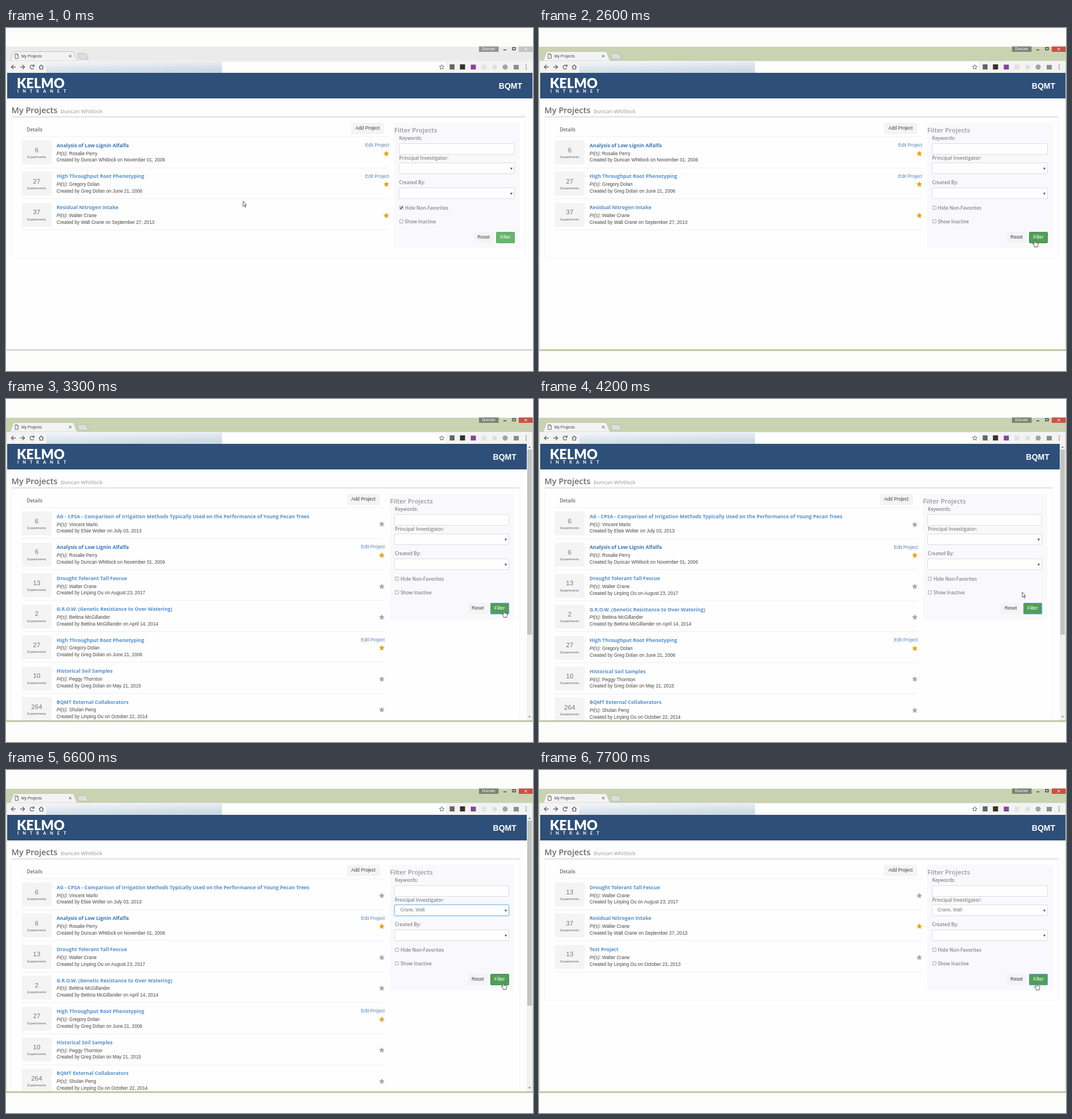
These frames come from a looping animation (927 by 604 pixels, 8 s). An HTML page:

```html
<!DOCTYPE html>
<html lang="en">
<head>
<meta charset="utf-8">
<title>My Projects</title>
<style>
html, body { margin: 0; width: 100%; height: 100%; overflow: hidden; background: #fdfefc; }
#stage { position: absolute; left: 0; top: 0; width: 927px; height: 604px; overflow: hidden;
  font: 8.25px "Liberation Sans", Arial, sans-serif; color: #444;
  --s: 0; --bar: #ebebeb; --close: #c4c4c4; --badge: #929292; --line: #b4b4b4; }
#stage.active { --bar: #c9d3b1; --close: #cb5045; --badge: #7d8270; --line: #a9b292; }
#stage div, #stage svg { position: absolute; box-sizing: border-box; }
.t { position: absolute; line-height: 0; white-space: nowrap; }
.c { transform: translateX(-50%); }
.os { font-family: "Open Sans", sans-serif; font-weight: 600; }
#page { left: 0; top: 0; width: 927px; height: 604px; background: #fdfefd; clip-path: inset(79px 1px 38px 2px); }
#header { left: 0; top: 79px; width: 927px; height: 45px; background: #2d4f78; color: #fff; }
#rule { left: 10px; top: 155px; height: 3px; width: calc(904px - 10.2px * var(--s)); background: #e7e8e8; }
#box { left: 9px; top: 158px; width: calc(905px - 10.2px * var(--s)); border: 1px solid #f3f4f3; border-top: 0; }
#list { left: 28px; top: 191px; width: calc(646px - 7.6px * var(--s)); border-top: 1px solid #f0f0f0; }
#stage .row { position: relative; overflow: hidden; border-bottom: 1px solid #f0f0f0; }
.item { left: 0; top: 0; width: 100%; height: 55px; }
.count { left: 0; top: 6.4px; width: 52px; height: 42px; background: #f4f4f4; }
.count::after { content: ""; position: absolute; left: 52px; top: 5px; border: 3px solid transparent; border-left-color: #f4f4f4; border-right: 0; }
.title { font-size: 8.75px; font-weight: 700; color: #5690cc; }
.title.strong { color: #3576bd; }
.edit { right: 0; color: #5c85b8; }
.star { right: 0; top: 23.5px; width: 10px; height: 10px; }
.btn { height: 20px; border-radius: 2px; background: #f4f4f4; color: #444; text-align: center; line-height: 20.5px; }
#panel { left: calc(683px - 7.6px * var(--s)); top: 167px; width: calc(221px - 2.6px * var(--s)); height: 221px; background: #f9f9fd; color: #858585; }
.field { left: 8px; right: 9px; height: 20px; border: 1px solid #dcdde0; border-radius: 2px; background: #fefefe; }
.field.focus { border-color: #7db9e6; box-shadow: 0 0 3px #a5d2f0; }
.field.sel::after { content: ""; position: absolute; right: 3px; top: 7.5px; border: 2px solid transparent; border-top: 4px solid #555; border-bottom: 0; }
.check { left: 8.5px; width: 7px; height: 7px; border: 1px solid #b0b0b0; border-radius: 1px; background: #f4f4f4; }
.check svg { left: -1px; top: -1px; }
#filter { right: 9px; top: 192px; width: 33px; background: #66b56d; border: 1px solid #5dae64; color: #fff; line-height: 18.5px; }
#filter.dark { background: #509f56; border-color: #438b48; }
#filter.focus { border-color: #5b9fd0; box-shadow: 0 0 1px #5b9fd0; }
#menu { left: 684px; top: 257px; width: 202px; height: 210px; background: #fefefe; border: 1px solid #a9b6c2; color: #777; }
#hover { left: 0; width: 190px; height: 10.5px; background: #2f90f7; }
.track { background: #f1f1f1; }
.thumb { background: #c3c3c3; }
#scroll { left: 916px; top: 79px; width: 10px; height: 488px; }
#cursor { left: 0; top: 0; overflow: visible; }
</style>
</head>
<body>
<div id="stage">
  <div id="page">
    <div id="header"></div>
    <div id="rule"></div>
    <div id="box"></div>
    <div id="list"></div>
    <div class="btn" style="left:calc(607px - 7.5px*var(--s));top:167px;width:58px">Add Project</div>
    <div id="panel"></div>
    <div id="menu"></div>
    <div id="scroll" class="track">
      <div id="thumb" class="thumb" style="left:1px;top:10px;width:8px"></div>
      <svg width="10" height="488" fill="#666"><path d="M3 7l2-2.5 2 2.5zM3 479.5l2 2.5 2-2.5z"/></svg>
    </div>
  </div>
  <svg id="chrome" width="927" height="604" fill="none">
    <path d="M0 33H927V58H0zM0 58H1V569H0zM926 58H927V569H926zM0 567H927V569H0z" fill="var(--bar)"/>
    <path d="M1 566H926V567H1z" fill="var(--line)"/>
    <path d="M6 58C10 57 11 41.5 15 41.5H117C121 41.5 122 57 127 58z" fill="#f3f3f3" stroke="#b5b8b0" stroke-width=".7"/>
    <path d="M126 45H141L145 55H131Q129 55 128 53z" fill="#dcdeda" stroke="#a9aca4" stroke-width=".7"/>
    <path d="M1 58H926V79H1z" fill="#f3f3f3"/>
    <path d="M71 60H774V78H71z" fill="#fefefe"/>
    <linearGradient id="blur" x2=".4" y2="1"><stop stop-color="#f3f6f9"/><stop offset="1" stop-color="#cddae5"/></linearGradient>
    <path d="M71 59H380V79H71z" fill="url(#blur)"/>
    <path d="M832 32.5H866.5V42H832z" fill="var(--badge)"/>
    <path d="M902 32.5H926.5V42H902z" fill="var(--close)"/>
    <path d="M912 35l4.5 4.5M916.5 35l-4.5 4.5" stroke="#fff"/>
    <g stroke="#444">
      <path d="M875 38.5H880M891 34.5H896V38.5H891z" stroke-width="1.3"/>
      <path d="M111 47.5l4 4M115 47.5l-4 4"/>
      <path d="M16 45.5H19.5L21.5 47.5V53.5H16zM19.5 45.5V47.5H21.5" stroke-width=".8"/>
    </g>
    <g stroke="#555" stroke-width="1.2">
      <path d="M17 68.7H9.5M13 65l-3.7 3.7 3.7 3.7M25 68.7H32.5M29 65l3.7 3.7-3.7 3.7"/>
      <path d="M49 67A3.5 3.5 0 1 0 49 70.5M49.3 64.5V67.5H46.3M58 69l4-4 4 4M59.5 68.5V72.5H64.5V68.5"/>
      <path d="M766.5 64.5l1.2 2.7 2.9.3-2.2 2 .7 2.9-2.6-1.5-2.6 1.5.7-2.9-2.2-2 2.9-.3z" stroke-width=".9"/>
    </g>
    <path d="M780.5 64H789V73H780.5z" fill="#666"/>
    <path d="M798.5 64H807.5V73H798.5z" fill="#393026"/>
    <path d="M817.5 64.5H826.5V73H817.5z" fill="#84459a"/>
    <path d="M836.5 64.5H845V73H836.5z" fill="#e3e3e3"/>
    <circle cx="859.5" cy="68.7" r="4" fill="#dedede"/>
    <circle cx="878" cy="68.7" r="4.5" fill="#a3a3a3"/>
    <path d="M893 65H902V73H893z" fill="#8d8d8d"/>
    <path d="M915 64.5v1.5M915 68v1.5M915 71.5v1.5" stroke="#555" stroke-width="1.5"/>
  </svg>
  <svg id="cursor" width="12" height="16" fill="#fff" stroke="#333" stroke-width=".8" stroke-linejoin="round">
    <path id="arrow" d="M0 0V9L2 7.2 3.5 10.5 5 9.8 3.5 6.7H6z"/>
    <path id="hand" d="M-1 .8Q0-.8 1 .8V4.2Q2 3.3 2.7 4.4 3.8 3.6 4.3 4.8 5.8 4.2 5.8 6V8.2L4.8 10V11.5H-.5V10L-3.3 6.4Q-3.5 4.8-2 5.5L-1 6.5z"/>
  </svg>
</div>
<script>
const $ = id => document.getElementById(id);
const add = (el, html) => el.insertAdjacentHTML('beforeend', html);
const text = (x, y, str, cls = '', css = '') =>
  `<span class="t ${cls}" style="${x === null ? '' : `left:${x}px;`}top:${y}px;${css}">${str}</span>`;
const clamp = v => Math.min(1, Math.max(0, v));
const swing = v => .5 - Math.cos(Math.PI * clamp(v)) / 2;

const LOOP = 8000, SLIDE = 400, ROW = 54.6, PAD = 6.4;
const CLICK = { box: 1700, filter: 2850, open: 5000, pick: 5650, refilter: 6700 };
const GROW = 2915, SHRINK = 6800;
const HEAD = 'Walter Crane';

// experiments, title, investigator, creator, date, favorite, editable
const projects = [
  [6, 'AG - CPSA - Comparison of Irrigation Methods Typically Used on the Performance of Young Pecan Trees', 'Vincent Marlo', 'Elsie Wolter', 'July 03, 2013'],
  [6, 'Analysis of Low Lignin Alfalfa', 'Rosalie Perry', 'Duncan Whitlock', 'November 01, 2006', 1, 1],
  [13, 'Drought Tolerant Tall Fescue', HEAD, 'Linping Ou', 'August 23, 2017'],
  [2, 'G.R.O.W. (Genetic Resistance to Over Watering)', 'Bettina McGillander', 'Bettina McGillander', 'April 14, 2014'],
  [27, 'High Throughput Root Phenotyping', 'Gregory Dolan', 'Greg Dolan', 'June 21, 2006', 1, 1],
  [10, 'Historical Soil Samples', 'Peggy Thornton', 'Greg Dolan', 'May 21, 2015'],
  [264, 'BQMT External Collaborators', 'Shulan Peng', 'Linping Ou', 'October 22, 2014'],
  [37, 'Residual Nitrogen Intake', HEAD, 'Walt Crane', 'September 27, 2013', 1],
  [13, 'Test Project', HEAD, 'Linping Ou', 'October 23, 2013'],
  [2, 'UPDATED: April 10th Project', 'Rosalie Perry', 'Duncan Whitlock', 'April 10, 2015'],
];
const people = ['', 'Crane, Walt', 'Whitlock, Duncan', '', 'Abanzor, Ximena', 'Adenhall, Kit', 'Adi, Rahmandar',
  'Adnoy, Neil', 'Adler, Conny', 'Adler, Tracy', 'Amberson, Seth', 'Amirul, Tanvebor', 'Arkwell, Bryony',
  'Ashcombe, Rolf', 'Bascomb, Leon', 'Bellamy, Seth', 'Bellamy, Greta', 'Benfold, Desmond', 'Wolter, Elsie', 'Bick, Stanley'];

add($('stage'), text(27, 49.5, 'My Projects', '', 'font-size:6.9px') +
  text(849, 37, 'Duncan', 'c', 'font-size:6.7px;color:#fff'));
$('stage').append($('cursor'));

add($('header'),
  text(19, 18, 'KELMO', '', 'font:900 23.5px/0 Lato,sans-serif') +
  text(20, 32.4, 'INTRANET', '', 'font:700 7.6px/0 Lato,sans-serif;letter-spacing:6.9px') +
  text(null, 23, 'BQMT', '', 'right:calc(19px + 10.2px*var(--s));font-size:14px;font-weight:700'));
add($('page'),
  text(9.5, 144.5, 'My Projects', 'os', 'font-size:14.5px;color:#6b6b6b') +
  text(96, 146.5, 'Duncan Whitlock', 'os', 'font-size:9px;color:#ababab') +
  text(36.5, 178.5, 'Details', 'os', 'color:#666'));
$('page').append($('menu'));

const star = color => `<svg class="star" viewBox="0 0 10 10"><path fill="${color}"
  d="M5 0l1.5 3.3 3.5.4-2.6 2.4.7 3.6L5 7.9 1.9 9.7l.7-3.6L0 3.7l3.5-.4z"/></svg>`;
for (const [n, title, lead, author, date, fav, editable] of projects) {
  add($('list'), `<div class="row"><div class="item"><div class="count"></div>
    ${text(26, 23, n, 'c', 'font-size:11.6px;color:#777')}
    ${text(26, 35.4, 'Experiments', 'c', 'font-size:5.95px;color:#666')}
    ${text(61, 14.8, title, 'os title' + (title.startsWith('Analysis') ? ' strong' : ''))}
    ${text(61, 29.6, `<i>PI(s):</i> ${lead}`)}
    ${text(61, 41.4, `Created by ${author} on ${date}`)}
    ${editable ? text(null, 15, 'Edit Project', 'edit') : ''}${star(fav ? '#e6a51a' : '#a9a9a9')}</div></div>`);
}
const rows = [...document.querySelectorAll('.row')];

const labels = [[27, 'Keywords:'], [61.5, 'Principal Investigator:'], [105, 'Created By:']];
add($('panel'),
  text(0, 12.5, 'Filter Projects', 'os', 'font-size:11.4px;color:#999') +
  labels.map(([y, s]) => text(8.5, y, s, 'os')).join('') +
  `<div class="field" style="top:36px"></div>
   <div class="field sel" id="lead" style="top:70px"></div>
   <div class="field sel" style="top:114px"></div>
   <div class="check" style="top:145.5px"><svg id="tick" width="7" height="7" fill="none" stroke="#333" stroke-width="1.3"><path d="M1.5 3.5L3 5 5.5 1.5"/></svg></div>
   <div class="check" style="top:170px"></div>` +
  text(18.5, 149.5, 'Hide Non-Favorites', 'os') + text(18.5, 174, 'Show Inactive', 'os') +
  '<div class="btn" style="right:46.5px;top:192px;width:35px">Reset</div><div class="btn" id="filter">Filter</div>');
add($('lead'), text(9, 9.2, 'Crane, Walt', '', 'color:#777'));
const choice = $('lead').firstChild;

add($('menu'), '<div id="hover"></div>' +
  people.map((p, i) => text(9.5, 5.2 + i * 10.43, p)).join('') +
  `<div class="track" style="right:0;top:0;width:10px;height:208px"></div>
   <div class="thumb" style="right:1px;top:10px;width:8px;height:10px"></div>
   <svg style="right:0;top:0" width="10" height="208" fill="#666"><path d="M3 6l2-2.5 2 2.5zM3 202l2 2.5 2-2.5z"/></svg>`);

// pointer path: time, x, y
const path = [[0, 417, 305], [50, 417, 305], [200, 722, 277], [550, 722, 277], [1200, 695, 315], [1800, 695, 315],
  [2350, 872, 374], [2650, 872, 374], [2900, 876, 373], [3500, 876, 373], [4050, 850, 340], [4250, 850, 340],
  [4850, 787, 248], [5050, 787, 250], [5180, 787, 262], [5280, 787, 262], [5500, 737, 273], [5800, 737, 273],
  [6450, 875, 375], [LOOP, 875, 376]];
function pointer(t) {
  const i = path.findIndex(k => k[0] > t);
  const [t0, x0, y0] = path[i - 1], [t1, x1, y1] = path[i];
  const u = swing((t - t0) / (t1 - t0));
  return [x0 + (x1 - x0) * u, y0 + (y1 - y0) * u];
}

function render(t) {
  const grow = swing((t - GROW) / SLIDE), keep = 1 - swing((t - SHRINK) / SLIDE);
  let total = 0;
  rows.forEach((row, i) => {
    const [, , lead, , , fav] = projects[i];
    const p = (fav ? 1 : grow) * (lead === HEAD ? 1 : keep);
    total += ROW * p;
    row.style.display = p > .005 ? '' : 'none';
    row.style.height = ROW * p + 'px';
    row.firstChild.style.top = -PAD * (1 - p) + 'px';
  });
  const bottom = Math.max(405.5, 206.5 + total);
  $('box').style.height = bottom - 158 + 'px';

  const scrolls = bottom > 547, view = 487;
  $('stage').style.setProperty('--s', scrolls ? 1 : 0);
  $('scroll').style.display = scrolls ? '' : 'none';
  $('thumb').style.height = 467 * view / (bottom - 54) + 'px';
  $('stage').classList.toggle('active', t >= CLICK.box);
  $('tick').style.display = t < CLICK.box ? '' : 'none';

  const [x, y] = pointer(t);
  const right = scrolls ? 885 : 895;
  const over = x > right - 33 && x < right && y > 359 && y < 379;
  const focus = t >= CLICK.filter && t < CLICK.open || t >= CLICK.refilter;
  $('filter').classList.toggle('dark', over || focus);
  $('filter').classList.toggle('focus', focus);
  $('lead').classList.toggle('focus', t >= CLICK.open && t < CLICK.refilter);
  choice.style.display = t >= CLICK.pick ? '' : 'none';
  $('menu').style.display = t >= CLICK.open && t < CLICK.pick ? '' : 'none';
  $('hover').style.top = (y > 268.5 ? 10.43 : 0) + 'px';

  $('cursor').style.transform = `translate(${x}px,${y}px)`;
  $('hand').style.display = over ? '' : 'none';
  $('arrow').style.display = over ? 'none' : '';
}

const start = performance.now();
(function tick() {
  render((performance.now() - start) % LOOP);
  requestAnimationFrame(tick);
})();
</script>
</body>
</html>
```
